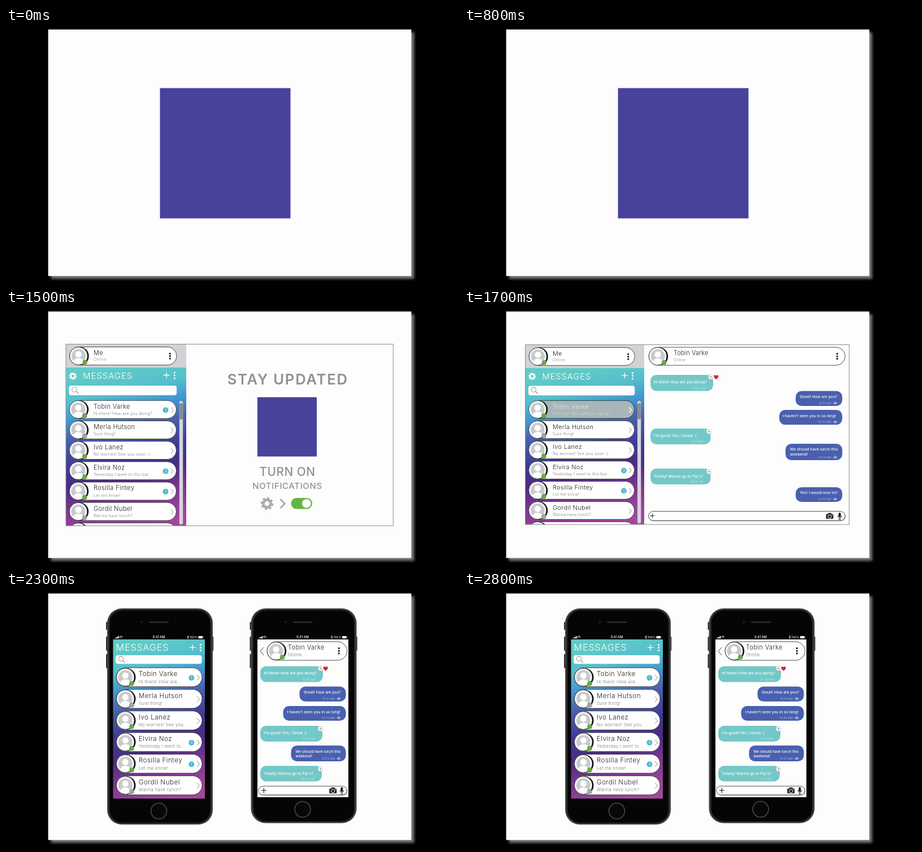
Write an HTML page that moves like this. It is 800 px wide and 450 px high and loops after 2900 ms.

```html
<!DOCTYPE html>
<html lang="en">
<head>
<meta charset="utf-8">
<title>Messenger slides</title>
<style>
html, body { margin: 0; width: 100%; height: 100%; overflow: hidden; background: #000; }
svg { position: absolute; left: 0; top: 0; font-family: Inter, "Liberation Sans", sans-serif; }
.card { fill: #fdfdfd; filter: drop-shadow(5px 5px 2px #777); }
.slide { opacity: 0; animation: 2900ms step-end infinite; }
#logo { animation-name: first; }
#welcome { animation-name: second; }
#chat { animation-name: third; }
#phones { animation-name: fourth; }
@keyframes first { 0% { opacity: 1 } 31.034%, 100% { opacity: 0 } }
@keyframes second { 0% { opacity: 0 } 31.034% { opacity: 1 } 55.172%, 100% { opacity: 0 } }
@keyframes third { 0% { opacity: 0 } 55.172% { opacity: 1 } 79.31%, 100% { opacity: 0 } }
@keyframes fourth { 0% { opacity: 0 } 79.31%, 100% { opacity: 1 } }
</style>
</head>
<body>
<svg width="800" height="450" viewBox="0 0 800 450">
  <defs>
    <linearGradient id="sky" x1=".42" y1="0" x2=".58" y2="1">
      <stop offset="0" stop-color="#62cbc6"/>
      <stop offset=".15" stop-color="#55bfcc"/>
      <stop offset=".27" stop-color="#4196cf"/>
      <stop offset=".38" stop-color="#4a62ae"/>
      <stop offset=".55" stop-color="#3f3a94"/>
      <stop offset=".68" stop-color="#4b2b86"/>
      <stop offset=".82" stop-color="#7b378f"/>
      <stop offset="1" stop-color="#a3459c"/>
    </linearGradient>
    <clipPath id="side"><path d="M106 61H319V382H106Z"/></clipPath>
  </defs>
  <rect class="card" x="74.6" y="2.6" width="642.8" height="436.8"/>
  <g id="logo" class="slide"></g>
  <g id="welcome" class="slide"></g>
  <g id="chat" class="slide"></g>
  <g id="phones" class="slide"></g>
</svg>
<script>
const TEAL = '#74c8c8', BLUE = '#4a60ae', GRAY = '#8f9194', GREEN = '#63b233', MARK = '#48429b';

const people = [
  { name: 'Tobin Varke', note: 'Hi there! How are you doing?', brief: 'Hi there! How are...', on: 1, count: 1 },
  { name: 'Merla Hutson', note: 'Sure thing!', on: 0 },
  { name: 'Ivo Lanez', note: 'No worries! See you soon :)', brief: 'No worries! See you...', on: 1 },
  { name: 'Elvira Noz', note: 'Yesterday I went to this bar...', brief: 'Yesterday I went to...', on: 1, count: 3 },
  { name: 'Rosilla Fintey', note: 'Let me know!', on: 1, count: 1 },
  { name: 'Gordil Nubel', note: 'Wanna have lunch?', on: 0 },
];

const rect = (x, y, x2, y2, r, fill, more = '') =>
  `<rect x="${x}" y="${y}" width="${x2 - x}" height="${y2 - y}" rx="${r}" fill="${fill}" ${more}/>`;
const dot = (x, y, r, fill, more = '') => `<circle cx="${x}" cy="${y}" r="${r}" fill="${fill}" ${more}/>`;
const line = (d, color, w = 1) => `<path d="${d}" fill="none" stroke="${color}" stroke-width="${w}"/>`;
const text = (x, y, size, str, fill = '#222', weight = 300, gap = 0, anchor = 'start') =>
  `<text x="${x}" y="${y}" font-size="${size}" fill="${fill}" font-weight="${weight}" letter-spacing="${gap}" text-anchor="${anchor}">${str}</text>`;
const at = (x, y, body) => `<g transform="translate(${x} ${y})">${body}</g>`;

const outline = 'stroke="#222" stroke-width=".8"';
const pill = (x, y, x2, y2, fill = '#fff') => rect(x, y, x2, y2, (y2 - y) / 2, fill, outline);
const kebab = (x, y, step, color) => [-1, 0, 1].map(i => dot(x, y + i * step, 1.6, color)).join('');
const plus = (x, y, r, color, w = 1.3) => line(`M${x - r} ${y}h${2 * r}M${x} ${y - r}v${2 * r}`, color, w);
const chevron = (x, y, w, h, color, thick = 1) => line(`M${x} ${y - h}l${w} ${h}l${-w} ${h}`, color, thick);
const gear = (x, y, r, color) => at(x, y,
  dot(0, 0, r * .58, 'none', `stroke="${color}" stroke-width="${r * .42}"`) +
  dot(0, 0, r * .86, 'none', `stroke="${color}" stroke-width="${r * .28}" pathLength="16" stroke-dasharray="1"`));
const search = (x, y) => dot(x, y, 4.2, 'none', 'stroke="#999" stroke-width="1.1"') +
  line(`M${x + 3} ${y + 3}l4.5 4`, '#999', 1.4);

const avatar = (x, y, on) => at(x, y,
  dot(2.2, 0, 16, '#111') + dot(0, 0, 15.8, '#fff', outline) + dot(0, 0, 12.5, '#c9cace') +
  dot(0, -3, 5.6, '#fff') + '<path d="M-8.5 9.2C-7 2 7 2 8.5 9.2A12.5 12.5 0 0 1-8.5 9.2Z" fill="#fff"/>' +
  dot(11.2, 11, 4, on ? GREEN : '#a3a5a8', 'stroke="#555" stroke-width=".4"'));

const badge = (x, y, n) => dot(x, y, 5, '#4fbac8') + text(x, y + 2.3, 6.5, n, '#fff', 400, 0, 'middle');

function sidebar(active) {
  let s = rect(106, 61, 319, 102, 0, '#d0d3d6') + rect(106, 102, 319, 382, 0, 'url(#sky)') +
    pill(112.5, 65.5, 302, 97.5) + avatar(128.5, 81.5, 1) +
    text(155, 80, 11, 'Me', '#222', 300, .4) + text(155, 90.3, 7, 'Online', '#888', 300, .3) +
    kebab(290.3, 81.7, 4.4, '#111') + gear(118.3, 117, 6.6, '#fff') +
    text(136, 122.4, 15, 'MESSAGES', '#fff', 300, .95) +
    plus(284, 115.5, 5.3, '#fff') + kebab(298.3, 116, 5, '#fff') +
    rect(111.5, 134, 302, 151, 4, '#fff') + search(121, 141) +
    rect(306.8, 161, 313.2, 380, 3.2, '#d3d5da') + rect(306.8, 165, 313.2, 194, 3.2, '#8b8c90');
  people.concat({ name: '', note: '', on: 1 }).forEach((p, i) => {
    const y = 176.3 + i * 36.15, sel = active && i === 0;
    s += pill(113, y - 16, 301.5, y + 16, sel ? '#a7b6b8' : '#fff') + avatar(128, y, p.on) +
      text(155, y - 1.5, 11, p.name, sel ? '#e2e8e8' : '#222', 300, .4) +
      text(155, y + 9.6, 7, p.note, sel ? '#d3dcdc' : '#777', 300, .35) +
      chevron(292, y + .8, 4, 4.8, sel ? '#fff' : '#888', sel ? 1.5 : 1);
    if (p.count && !sel) s += badge(282.5, y + .9, p.count);
  });
  return `<g clip-path="url(#side)">${s}</g>`;
}

const heart = (x, y) => at(x, y,
  '<path d="M0 4.2C-7-.6-3.4-6 0-2.2C3.4-6 7-.6 0 4.2Z" fill="#d22630"/>');
const eye = (x, y) => line(`M${x - 3.5} ${y}q3.5-4 7 0q-3.5 4-7 0`, '#d5dcf0', .7) + dot(x, y, 1.2, '#d5dcf0');

// Bubble with its text start, first baseline, lines and time
function bubble(mine, x, y, x2, y2, tx, ty, lines, time, size = 6.6) {
  const end = mine ? x2 - 19.5 : x2 - 13;
  return rect(x, y, x2, y2, 10.5, mine ? BLUE : TEAL) +
    lines.split('|').map((l, i) => text(tx, ty + i * size * 1.32, size, l, '#fff', 500, .1)).join('') +
    text(end, y2 - 3, 5, time, mine ? '#c3cce8' : '#cdeceb', 300, .2, 'end') +
    (mine ? eye(x2 - 12.5, y2 - 5) : '');
}
const react = (x, y) => dot(x, y, 4.3, '#fff', 'stroke="#aaa" stroke-width=".6"') + plus(x, y, 2.4, '#777', .7);

const camera = (x, y) => at(x, y,
  rect(-6.5, -3.6, 6.5, 5, 1.5, '#222') + rect(-3, -5.5, 3, -2, 1, '#222') +
  dot(0, .8, 3.1, '#222', 'stroke="#fff" stroke-width="1"') + dot(4.8, -1.8, .7, '#fff'));
const mic = (x, y) => at(x, y, rect(-1.9, -6, 1.9, 2, 1.9, '#111') +
  line('M-3.3-1v1a3.3 3.3 0 0 0 6.6 0v-1M0 3.4v2.6M-2.2 6h4.4', '#111', .9));
const entry = (x, y, x2, y2) => rect(x + 1, y + 1.3, x2 + 1, y2 + 1.3, 8, '#bbb') + pill(x, y, x2, y2);

function welcome() {
  return sidebar(false) + rect(106, 60.5, 685.3, 382.3, 0, 'none', 'stroke="#8c8e90"') +
    text(498.8, 132, 25.6, 'STAY UPDATED', GRAY, 600, 1.8, 'middle') +
    rect(445, 154.5, 550, 259.5, 0, MARK) +
    text(498, 294.3, 20.8, 'TURN ON', GRAY, 500, .5, 'middle') +
    text(498, 316.7, 15, 'NOTIFICATIONS', GRAY, 500, .6, 'middle') +
    gear(462, 343, 11.4, '#a9abae') + chevron(485.5, 343, 8, 8, '#a9abae', 2.8) +
    rect(504.5, 333, 542, 352.5, 9.7, '#63b545') + dot(531.8, 342.8, 7.8, '#fff');
}

function chat() {
  return `<g transform="translate(3.8 1.7) scale(.988 .99)">${sidebar(true)}</g>` +
    rect(108.5, 61.5, 681.8, 380, 0, 'none', 'stroke="#8c8e90"') +
    pill(327, 66, 674.5, 98) + avatar(343, 82, 1) +
    text(371, 80.4, 11, people[0].name, '#222', 300, .1) +
    text(371, 90.7, 7, 'Online', '#888', 300, .1) + kebab(660.5, 82, 4.4, '#111') +
    bubble(0, 330, 115, 441, 143.5, 336, 130, 'Hi there! How are you doing?', '10:40 AM') +
    react(436.7, 118.7) + heart(446.3, 118.8) +
    bubble(1, 587, 143.5, 669.5, 170, 594.5, 156.3, 'Great! How are you?', '10:41 AM') +
    bubble(1, 558, 177, 669.5, 203.3, 564, 189.8, 'I haven\'t seen you in so long!', '10:43 AM') +
    bubble(0, 330, 210, 436.5, 238, 336, 225.2, 'I\'m good! Yes, I know :(', '10:51 AM') + react(433.4, 215.3) +
    bubble(1, 569, 237, 669.5, 266, 577, 249.3, 'We should have lunch this|weekend!', '10:53 AM') +
    bubble(0, 330, 281, 436.5, 309, 336, 297, 'Totally! Wanna go to Pip\'s?', '10:54 AM') + react(433.6, 286.3) +
    bubble(1, 587, 314, 669.5, 340, 594.5, 326.3, 'Yes! I would love to!!', '10:55 AM') +
    entry(326.5, 356.7, 674.5, 373) + plus(333.3, 364.5, 4, '#222', 1) +
    camera(647.3, 365) + mic(665, 365);
}

function phone(x, bottom, home) {
  const side = '#303136';
  return at(x, 0,
    rect(-2, 53, 2, 67, 1, side) + rect(-2, 79, 2, 104, 1, side) + rect(-2, 110, 2, 135, 1, side) +
    rect(184, 79, 188.2, 104, 1, side) +
    rect(0, 29, 187, bottom, 26, '#45464c') + rect(2, 30.5, 185, bottom - 1.5, 24.5, '#26272b') +
    rect(4.5, 32.5, 182.5, bottom - 3.5, 22, '#050506') +
    dot(61.5, 53.5, 2.4, '#191a22') + rect(74, 52, 109, 55, 1.5, '#29292c') +
    dot(91.5, home, 14, '#080809', 'stroke="#4b4c50" stroke-width="1.5"') +
    [0, 1, 2, 3].map(i => rect(14 + i * 1.9, 81 - i, 15.4 + i * 1.9, 82.3, 0, '#fff')).join('') +
    line('M22 79.3q2.7-2.6 5.4 0M23.3 80.8q1.4-1.4 2.8 0', '#fff', .9) +
    text(91.5, 82.4, 5.5, '9:41 AM', '#fff', 500, .1, 'middle') +
    line('M141.5 78.5l3 3l-1.5 1.5v-6l1.5 1.5l-3 3', '#fff', .6) +
    text(146, 82.4, 5.4, '100%', '#fff', 400) +
    rect(161.5, 78, 169, 82.2, .8, '#fff') + rect(169.6, 79.3, 170.5, 81, .4, '#fff'));
}

function inbox() {
  return phone(179, 412, 388) + rect(189.5, 84, 352, 366, 0, 'url(#sky)') +
    text(194.5, 104, 16.2, 'MESSAGES', '#fff', 300, .85) +
    plus(330, 98.3, 5.3, '#fff') + kebab(344.5, 98.7, 5, '#fff') +
    rect(194, 112, 346.5, 127.3, 4, '#fff') + search(203.5, 118.3) +
    people.map((p, i) => {
      const y = 151 + i * 38.3;
      return pill(195, y - 16.8, 347, y + 16.8) + avatar(211.3, y, p.on) +
        text(234.8, y - 1.8, 11.7, p.name, '#222', 300, .45) +
        text(234.8, y + 10.5, 7.8, p.brief || p.note, '#777', 300, .3) +
        (p.count ? badge(328.3, y + 1, p.count) : '') + chevron(338, y + .8, 4.5, 5, '#888');
    }).join('');
}

function thread() {
  return phone(433.5, 409.5, 385) + rect(445, 84, 606, 363.5, 0, '#fdfdfd') +
    line('M456 98l-6 7l6 7', '#999', 1.6) +
    pill(462, 88, 603.5, 121) + avatar(478, 104.5, 1) +
    text(499, 102.2, 11, people[0].name, '#222', 300, .4) +
    text(499, 114.3, 7.8, 'Online', '#777', 300, .2) + kebab(589.3, 104.3, 4.6, '#111') +
    bubble(0, 450, 131.5, 561, 159.5, 456.5, 146.3, 'Hi there! How are you doing?', '10:40 AM') +
    react(556.7, 135.5) + heart(565.7, 135.5) +
    bubble(1, 519.5, 167.5, 601.5, 194, 527, 180.3, 'Great! How are you?', '10:41 AM') +
    bubble(1, 490.5, 202, 601.5, 228, 497.5, 214.6, 'I haven\'t seen you in so long!', '10:43 AM') +
    bubble(0, 450, 237, 560, 265, 456.5, 252.3, 'I\'m good! Yes, I know :(', '10:51 AM') + react(556.5, 242.3) +
    bubble(1, 504.5, 272, 601.5, 300, 512.5, 284.6, 'We should have lunch this|weekend!', '10:53 AM', 6.2) +
    bubble(0, 450, 308, 559, 335.5, 456.5, 323.7, 'Totally! Wanna go to Pip\'s?', '10:54 AM') + react(556.5, 313.7) +
    entry(446.7, 344, 603.3, 359.5) + plus(456.3, 351.5, 4.5, '#222', 1.2) +
    camera(578.7, 351.8) + mic(594.3, 351.8);
}

const fill = (id, body) => { document.getElementById(id).innerHTML = body; };
fill('logo', rect(272.5, 106.5, 503.5, 337.3, 0, MARK));
fill('welcome', welcome());
fill('chat', chat());
fill('phones', inbox() + thread());
</script>
</body>
</html>
```
